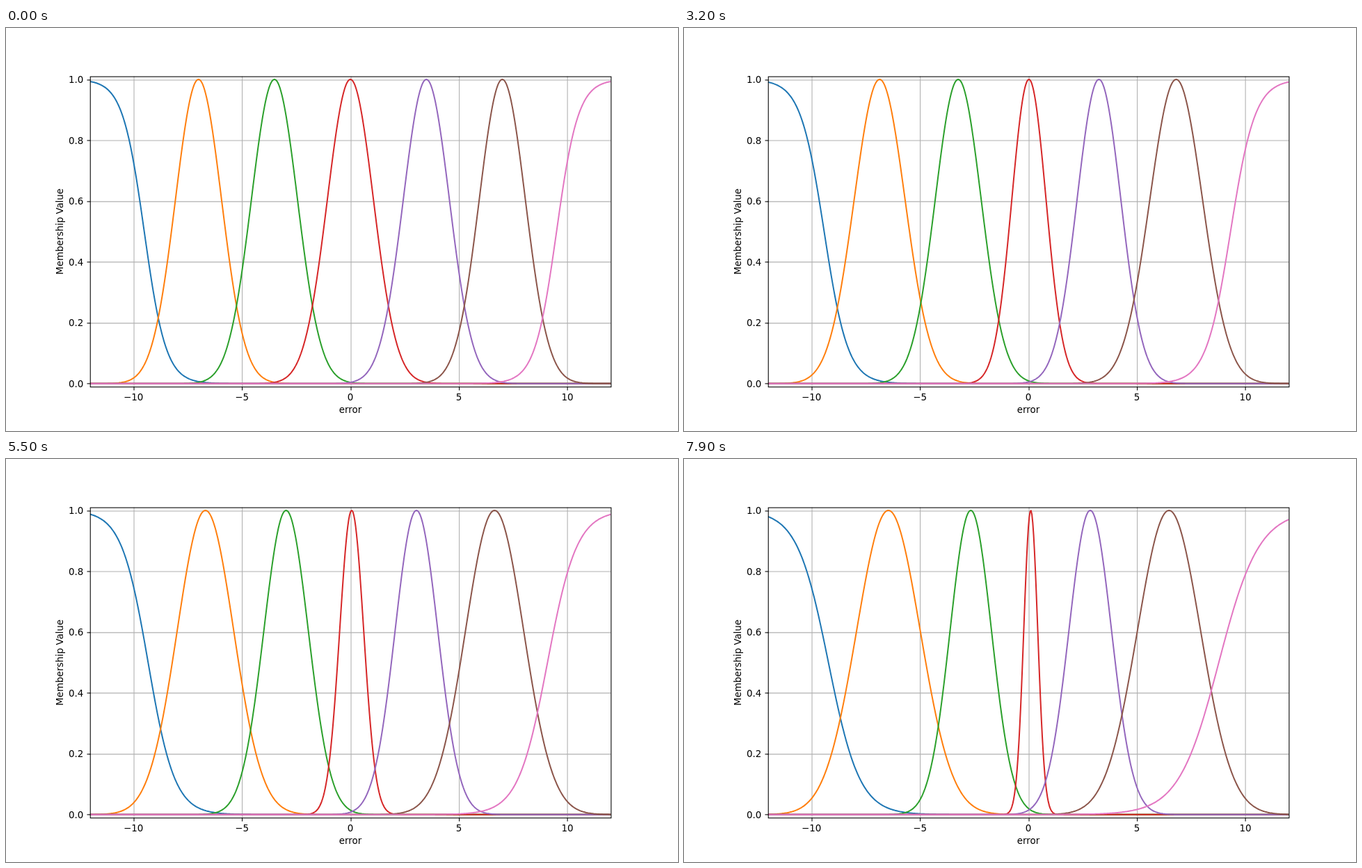
Animation, 966 px wide and 580 px high, one loop 8 s. Source, as an HTML page:

```html
<!DOCTYPE html>
<html lang="en">
<head>
<meta charset="utf-8">
<title>Membership functions</title>
<style>
  html, body { margin: 0; width: 966px; height: 580px; overflow: hidden; background: #fff; }
  svg { display: block; }
  text { font: 13.89px "DejaVu Sans", sans-serif; fill: #000; }
  line, .frame { fill: none; stroke: #000; stroke-width: 1.11; }
  .grid { stroke: #b0b0b0; }
  .curve { fill: none; stroke-width: 2.08; stroke-linejoin: round; }
</style>
</head>
<body>
<svg width="966" height="580" viewBox="0 0 1000 600" preserveAspectRatio="none">
  <clipPath id="area"><rect x="125" y="72" width="775" height="462"/></clipPath>
  <g id="axes"></g>
  <g id="curves" clip-path="url(#area)"></g>
  <rect class="frame" x="125.5" y="72.5" width="775" height="462"/>
  <text x="512.5" y="573" text-anchor="middle">error</text>
  <text transform="translate(84.7 303) rotate(-90)" text-anchor="middle">Membership Value</text>
</svg>
<script>
const LOOP = 8000, HOLD = 800, STEP = 100;
const LAST = (LOOP - HOLD) / STEP;
const px = x => 512.5 + x * 775 / 24;
const py = y => 534 - (y + 0.01) * 462 / 1.02;
const snap = v => Math.floor(v + 0.5) + 0.5;

function add(parent, tag, attrs, text) {
  const el = document.createElementNS("http://www.w3.org/2000/svg", tag);
  for (const name in attrs) el.setAttribute(name, attrs[name]);
  if (text) el.textContent = text;
  return parent.appendChild(el);
}

const axes = document.getElementById("axes");
const line = (cls, x1, y1, x2, y2) => add(axes, "line", { class: cls, x1, y1, x2, y2 });
const label = (x, y, anchor, text) => add(axes, "text", { x, y, "text-anchor": anchor }, text);

for (let v = -10; v <= 10; v += 5) {
  const x = snap(px(v));
  line("grid", x, 72, x, 534);
  line("tick", x, 534.5, x, 539.4);
  label(px(v), 554, "middle", String(v).replace("-", "\u2212"));
}
for (let i = 0; i <= 5; i++) {
  const y = snap(py(i / 5));
  line("grid", 125, y, 900, y);
  line("tick", 120.6, y, 125.5, y);
  label(115.2, py(i / 5) + 5.2, "end", (i / 5).toFixed(1));
}

const bell = (x, c, w) => Math.exp(-((x - c) ** 2) / (2 * w * w));
const fall = (x, c, w) => 1 / (1 + Math.exp(w * (x - c)));
const rise = (x, c, w) => fall(-x, -c, w);

// Centre and width (or slope) at the start, halfway and at the end
const CURVES = [
  { color: "#1f77b4", shape: fall, centre: [-9.5, -9.37, -9.215], width: [2, 1.738, 1.39] },
  { color: "#ff7f0e", shape: bell, centre: [-7, -6.777, -6.45], width: [1.06, 1.228, 1.462] },
  { color: "#2ca02c", shape: bell, centre: [-3.5, -3.108, -2.655], width: [1.06, 1.044, 0.952] },
  { color: "#d62728", shape: bell, centre: [0, 0.04, 0.108], width: [1.06, 0.673, 0.322] },
  { color: "#9467bd", shape: bell, centre: [3.5, 3.15, 2.85], width: [1.06, 0.992, 0.98] },
  { color: "#8c564b", shape: bell, centre: [7, 6.73, 6.48], width: [1.06, 1.273, 1.452] },
  { color: "#e377c2", shape: rise, centre: [9.5, 9.212, 8.774], width: [2, 1.645, 1.078] }
];

// Parabola through three evenly spaced values
const glide = ([a, mid, b], u) =>
  a + (b - a) * u + 4 * u * (1 - u) * (mid - (a + b) / 2);

const layer = document.getElementById("curves");
for (const curve of CURVES) {
  curve.path = add(layer, "path", { class: "curve", stroke: curve.color });
}

function draw(u) {
  for (const { shape, centre, width, path } of CURVES) {
    const c = glide(centre, u), w = glide(width, u), points = [];
    for (let i = 0; i <= 600; i++) {
      const x = -12 + i * 0.04;
      points.push(px(x).toFixed(2) + " " + py(shape(x, c, w)).toFixed(2));
    }
    path.setAttribute("d", "M" + points.join("L"));
  }
}

const start = performance.now();
let shown = -1;
function tick() {
  const t = (performance.now() - start) % LOOP;
  const step = t < HOLD ? 0 : Math.floor((t - HOLD) / STEP) + 1;
  if (step !== shown) draw((shown = step) / LAST);
  requestAnimationFrame(tick);
}
tick();
</script>
</body>
</html>
```
